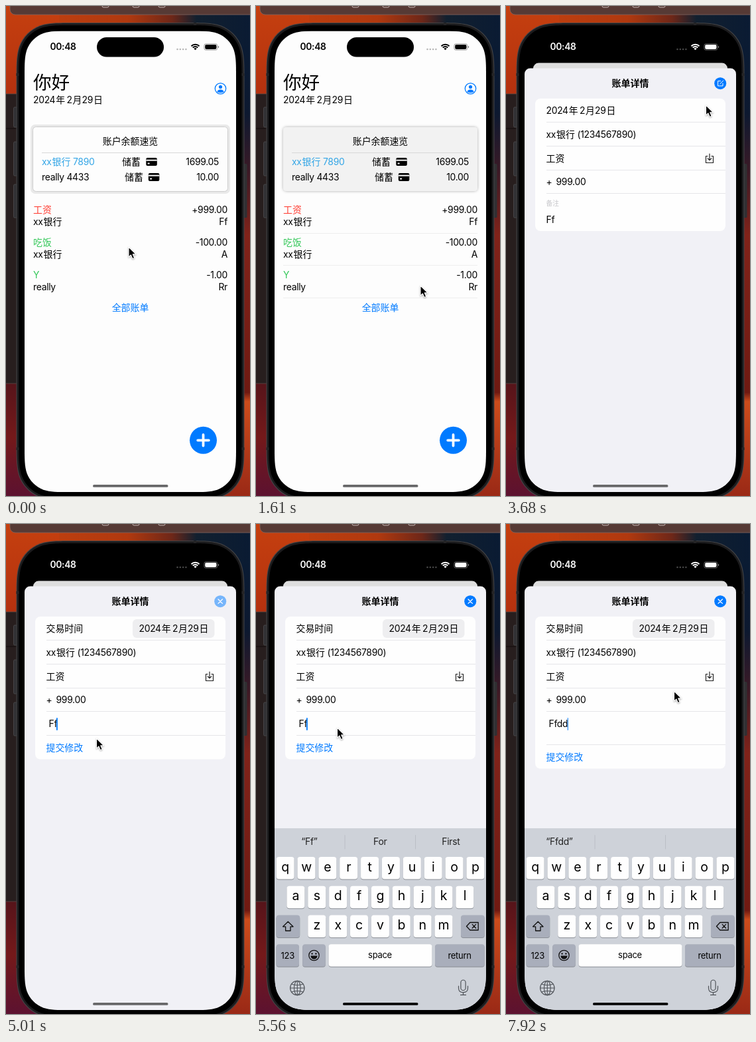
Recreate the animation shown at these times as an HTML page. Size 368 px wide and 736 px high, loop 8000 ms.

```html
<!DOCTYPE html>
<html lang="zh">
<head>
<meta charset="utf-8">
<style>
html,body{margin:0;width:100%;height:100%;overflow:hidden;background:#000}
svg{display:block;width:100vw;height:100vh}
text{font:13.9px Inter,"Noto Sans CJK SC","Noto Sans CJK",sans-serif;letter-spacing:-.3px;white-space:pre}
.c{letter-spacing:0}
</style>
</head>
<body>
<svg id="stage" viewBox="0 0 368 736"></svg>
<script>
const LOOP = 8000, STEP = 146.6;
const BLUE = '#007aff', MID = 'text-anchor="middle"', END = 'text-anchor="end"';
const DATE = '2024年\u20092月29日';

const rect = (x, y, w, h, fill, r = 0, more = '') =>
  `<rect x="${x}" y="${y}" width="${w}" height="${h}" rx="${r}" fill="${fill}" ${more}/>`;
const circle = (x, y, r, fill, more = '') => `<circle cx="${x}" cy="${y}" r="${r}" fill="${fill}" ${more}/>`;
const stroke = (d, color, w = 1, more = '') =>
  `<path d="${d}" fill="none" stroke="${color}" stroke-width="${w}" stroke-linecap="round" stroke-linejoin="round" ${more}/>`;
const rule = (x1, x2, y, color) => `<path d="M${x1} ${y}H${x2}" stroke="${color}"/>`;
const group = (x, y, body, more = '') => `<g transform="translate(${x} ${y}) ${more}">${body}</g>`;
// Chinese runs keep their natural spacing, with a small gap after Latin text
const text = (x, y, s, more = '') => `<text x="${x}" y="${y}" ${more}>` +
  s.replace(/[\u4e00-\u9fff]+/g, (run, at) => `<tspan class="c" dx="${at ? 1 : 0}">${run}</tspan>`) + '</text>';
const size = (px, weight = 400) => `style="font-size:${px}px;font-weight:${weight}"`;

// Rectangle with continuous-curvature corners
function smooth(x, y, w, h, r, fill) {
  const corner = [[0, 1.528], [0, 1.088], [0, .868], [.075, .631], [.169, .373], [.373, .169], [.631, .075], [.868, 0], [1.088, 0], [1.528, 0]];
  const back = [...corner].reverse();
  const side = (pts, right, low) => pts.map(([u, v]) =>
    [right ? x + w - u * r : x + u * r, low ? y + h - v * r : y + v * r]);
  const parts = [side(corner, 0, 0), side(back, 1, 0), side(corner, 1, 1), side(back, 0, 1)];
  const d = parts.map((p, i) => `${i ? 'L' : 'M'}${p[0]}C${p.slice(1).join(' ')}`).join('');
  return `<path d="${d}Z" fill="${fill}"/>`;
}

// Linear track through [step, ...values]
function track(keys, k) {
  let i = 1;
  while (i < keys.length - 1 && keys[i][0] < k) i++;
  const a = keys[i - 1], b = keys[i];
  const p = Math.min(1, Math.max(0, (k - a[0]) / (b[0] - a[0])));
  return a.slice(1).map((v, j) => v + (b[j + 1] - v) * p);
}

const POINTER = [[0,185,362],[8,268,440],[9,266,434],[11,248,420],[14,170,446],[16,112,430],
  [18,70,421],[20,62,420],[22,64,419],[24,190,200],[25,301.5,149],[26,317,117],[29,317,115],
  [31,270,170],[33,152,304],[34,136.5,322],[36,124,308],[38,122.5,306],[43,124,560],
  [48,124,560],[50,190,380],[52,262,150],[53,266,114],[54,253.5,251]];
const SHEET = [[20,0],[21,.35],[22,.8],[23,.95],[24,1]];
const KEYS = [[34,0],[35,.55],[36,.93],[37,1]];

const desktop = `
<defs>
  <linearGradient id="top"><stop stop-color="#c5420f"/><stop offset=".5" stop-color="#b0390f"/>
    <stop offset=".68" stop-color="#6e2718"/><stop offset=".78" stop-color="#12202f"/><stop offset="1" stop-color="#0a1b33"/></linearGradient>
  <linearGradient id="left" x2="0" y2="1"><stop stop-color="#c5400f"/><stop offset=".18" stop-color="#b4310f"/>
    <stop offset=".77" stop-color="#56141a"/><stop offset=".88" stop-color="#74191a"/><stop offset="1" stop-color="#5c1230"/></linearGradient>
  <linearGradient id="right" x2="0" y2="1"><stop stop-color="#0a1b33"/><stop offset=".15" stop-color="#0d1930"/>
    <stop offset=".28" stop-color="#3c1a26"/><stop offset=".42" stop-color="#80231a"/><stop offset=".77" stop-color="#701a12"/>
    <stop offset=".79" stop-color="#cc4c1c"/><stop offset="1" stop-color="#9a2916"/></linearGradient>
  <filter id="soft" x="-10%" y="-20%" width="120%" height="140%"><feDropShadow dx="0" dy="0" stdDeviation="2" flood-opacity=".33"/></filter>
  <clipPath id="screen">${smooth(28, 37.5, 319, 692.5, 45, '#000')}</clipPath>
</defs>
${rect(0, 0, 368, 100, 'url(#top)')}${rect(0, 0, 80, 736, 'url(#left)')}${rect(290, 60, 78, 676, 'url(#right)')}
${rect(6, -12, 375, 25, '#563a35', 8, 'stroke="#806660" stroke-width=".8"')}
${[150, 196, 235].map(x => rect(x - 5, -6, 10, 8, 'none', 2, 'stroke="#c5b8b5"')).join('')}
${rect(-9, 132, 60, 435, '#271e1e', 0, 'stroke="#5a4a47" stroke-width=".8"')}${rule(0, 16, 184, '#100b0b')}
${[[152, 30], [204, 51], [268, 50]].map(([y, h]) => rect(11.5, y, 6, h, '#303033', 1.5, 'stroke="#525255" stroke-width=".7"')).join('')}
${rect(357, 237, 6.5, 81, '#303033', 1.5)}
${smooth(15.5, 25, 344, 717.5, 57, '#444446')}${smooth(16.6, 26.1, 341.8, 715.3, 56, '#1b1b1d')}${smooth(19.5, 29, 336, 709.5, 53, '#000')}
${rect(283, 25, 4, 4, '#242426')}${[101, 663].map(y => rect(15.5, y, 4, 4, '#242426') + rect(355.5, y, 4, 4, '#242426')).join('')}`;

function status(ink) {
  const arc = r => `M${-r * .7} ${-r * .7}A${r} ${r} 0 0 1 ${r * .7} ${-r * .7}`;
  return rect(137, 47, 101, 29.5, '#000', 14.75) +
    text(86, 66.3, '00:48', `${MID} fill="${ink}" ${size(13.8, 600)}`) +
    [0, 1, 2, 3].map(i => circle(258.5 + i * 4.3, 65, 1.3, ink, 'opacity=".28"')).join('') +
    group(285.5, 66.3, stroke(arc(8.6) + arc(5.4), ink, 2, 'style="stroke-linecap:butt"') + `<path d="M0 0L-2.2 -2.4Q0 -4 2.2 -2.4Z" fill="${ink}"/>`) +
    rect(298.8, 56.7, 20, 9.6, 'none', 3, `stroke="${ink}" stroke-opacity=".4" stroke-width=".9"`) +
    rect(300.2, 58.1, 17.2, 6.8, ink, 1.8) + rect(319.8, 60, 1.3, 3, ink, .6, 'opacity=".45"');
}

const bankCard = (x, y) => rect(x, y, 16.5, 12, '#000', 2) + rect(x, y + 2.7, 16.5, 2, '#f4f4f4') + rect(x + 2.3, y + 7.5, 3, 2, '#f4f4f4', .5);

function home(k, radius) {
  const grey = k >= 20, fresh = k < 1;
  const tint = grey ? '#b0b0b2' : BLUE;
  const entry = (y, title, color, account, amount, note) =>
    text(41, y, title, `fill="${color}"`) + text(41, y + 18, account) + text(334, y, amount, END) + text(334, y + 18, note, END);
  const card = fresh
    ? rect(37, 178, 301, 104, '#e9e9e9', 7) + rect(40.5, 181.5, 294, 97, '#fdfdfd', 5, 'stroke="#cdcdcd"')
    : rect(41, 182, 293, 96, '#f2f2f2', 5, 'filter="url(#soft)"');
  return rect(28, 37.5, 319, 692.5, '#fdfdfd', radius) +
    text(41, 125.3, '你好', size(27.6)) + text(41, 146, DATE) +
    circle(323.5, 124, 8.2, 'none', `stroke="${tint}" stroke-width="1.3"`) + circle(323.5, 121.6, 2.6, tint) +
    `<path d="M318.4 129Q319 125.4 323.5 125.4T328.6 129Q323.5 131.4 318.4 129Z" fill="${tint}"/>` +
    card + text(187.5, 208.3, '账户余额速览', MID) + rule(54, 321, 220.5, '#d8d8d8') +
    text(54, 239, 'xx银行 7890', 'fill="#32a5e6"') + text(175, 239, '储蓄') + bankCard(211.3, 228) + text(321, 239, '1699.05', END) +
    text(54, 262, 'really 4433') + text(179, 262, '储蓄') + bankCard(214.8, 251) + text(321, 262, '10.00', END) +
    entry(311, '工资', '#ff3b30', 'xx银行', '+999.00', 'Ff') +
    entry(360, '吃饭', '#34c759', 'xx银行', '-100.00', 'A') +
    entry(409, 'Y', '#34c759', 'really', '-1.00', 'Rr') +
    (fresh ? '' : [341.5, 389.5, 438.5].map(y => rule(41, 334, y, '#eee')).join('')) +
    text(187.5, 457.7, '全部账单', `${MID} fill="${grey ? '#bcbcbe' : BLUE}"`) +
    circle(297.5, 652.3, 20.5, grey ? '#b9b9b9' : BLUE) + stroke('M289.2 652.3H305.8M297.5 644V660.6', '#fff', 3.8);
}

function sheet(k) {
  const edit = k >= 30, note = k < 45 ? 'Ff' : k < 48 ? 'Ffd' : 'Ffdd';
  const grow = k >= 48 ? 14 : 0, bottom = edit ? 353.5 + grow : 338;
  const pale = k === 29 || k === 34 || k === 35;
  const lines = [174.5, 210.5, 246.5, 281.5].concat(edit ? 317.5 + grow : []);
  const caret = 76 + (note.length - 2) * 8.2;
  return rect(28, 93.5, 319, 660, '#f1f1f6', 8.5) +
    text(187.5, 121, '账单详情', `${MID} ${size(14, 600)}`) +
    circle(323.2, 116.2, 9, pale ? '#76b5fb' : BLUE) +
    (edit ? stroke('M320 113L326.4 119.4M326.4 113L320 119.4', '#fff', 1.3)
          : stroke('M323.5 112.7H319.6V120H327V116.3M322.8 117L327.6 112.2', '#fff', 1)) +
    rect(44, 139, 287, bottom - 139, '#fefefe', 8) + lines.map(y => rule(61, 331, y, '#e6e6e9')).join('') +
    (edit ? text(60.5, 162, '交易时间') + rect(191, 143, 123.5, 28, '#eeeef0', 6) : '') +
    text(edit ? 200.5 : 60.5, 162, DATE) +
    text(60.5, 198, 'xx银行 (1234567890)') + text(60.5, 233.7, '工资') +
    text(60.5, 269.3, '+') + text(75.5, 269.3, '999.00') +
    stroke('M304 225.5H301.5V235.5H312.5V225.5H310M307 222V231.5M304.3 229L307 231.7L309.7 229', '#222', 1.2) +
    (edit
      ? text(64.5, 305, note) + (k >= 33 ? rect(caret, 291, 1.8, 19, BLUE, .9, k === 54 ? 'opacity=".6"' : '') : '') +
        text(60.5, 340.7 + grow, '提交修改', `fill="${BLUE}"`)
      : text(60.5, 300, '备注', `fill="#c5c5c9" ${size(9.7)}`) + text(60.5, 325.7, 'Ff'));
}

function keyboard(k) {
  const key = (x, y, w, fill = '#fefefe') => rect(x, y + 1, w, 33.5, '#8b8f96', 4) + rect(x, y, w, 33.5, fill, 4);
  const row = (letters, x0, y) => [...letters].map((c, i) => {
    const x = x0 + i * 31.87;
    return key(x, y, 27) + text(x + 13.5, y + 21.7, c, `${MID} ${size(19.5)}`);
  }).join('');
  const words = k < 47 ? ['“Ff”', 'For', 'First'] : [k < 48 ? '“Ffd”' : '“Ffdd”'];
  const dark = '#a9aebb', ink = '#4f5359';
  const popup = k === 44 || k === 47
    ? `<path d="M103 492H144Q149.5 492 149.5 498V525C149.5 534 137.3 533 137.3 543V573Q137.3 577.5 133 577.5H114.5Q110.2 577.5 110.2 573V543C110.2 533 98 534 98 525V498Q98 492 103 492Z" fill="#fefefe" stroke="#b5b9c0" stroke-width=".6"/>` +
      text(123.7, 523, 'd', `${MID} ${size(29)}`) : '';
  return rect(28, 457, 319, 290, '#ced2d9') +
    words.map((w, i) => text(80.5 + i * 106.7, 482.3, w, `${MID} fill="#222"`)).join('') +
    stroke('M134 467.5V488M240.5 467.5V488', '#b9bdc5', .9) +
    row('qwertyuiop', 30.6, 500) + row('asdfghjkl', 46.4, 543.7) + row('zxcvbnm', 78.3, 587.4) +
    key(30.6, 587.4, 35.6, dark) + stroke('M48.3 597.3L56 604.8H52V611H44.6V604.8H40.6Z', '#111', 1.3) +
    key(309, 587.4, 35.6, dark) + stroke('M317.5 604.2L322.8 598.5H335.2V610H322.8ZM326.2 601.4L331.6 607M331.6 601.4L326.2 607', '#111', 1.3) +
    key(30.6, 631.2, 34.4, dark) + text(47.8, 652.8, '123', `${MID} ${size(13)}`) +
    key(70.2, 631.2, 34.6, dark) + circle(87.5, 648, 7.7, 'none', 'stroke="#111" stroke-width="1.3"') +
    circle(84.6, 645.4, 1.2, '#111') + circle(90.4, 645.4, 1.2, '#111') + '<path d="M82.3 648.6H92.7Q91.7 653.8 87.5 653.8T82.3 648.6Z" fill="#111"/>' +
    key(109.5, 631.2, 156) + text(187, 652.3, 'space', `${MID} ${size(13)}`) +
    key(270, 631.2, 74.6, dark) + text(307, 652.8, 'return', `${MID} ${size(13)}`) +
    group(62.3, 697, circle(0, 0, 10.7, 'none', `stroke="${ink}" stroke-width="1.2"`) +
      `<ellipse rx="4.8" ry="10.7" fill="none" stroke="${ink}" stroke-width="1.1"/>` +
      stroke('M0 -10.7V10.7M-10.7 0H10.7M-8.6 -6Q0 -2.6 8.6 -6M-8.6 6Q0 2.6 8.6 6', ink, 1.1)) +
    group(312.5, 696, rect(-3.6, -11, 7.2, 15.5, 'none', 3.6, `stroke="${ink}" stroke-width="1.2"`) +
      stroke('M-7 -2V1Q-7 7.6 0 7.6T7 1V-2M0 7.6V11.4M-4 11.4H4', ink, 1.2)) + popup;
}

const pointer = (x, y) => group(x, y,
  '<path d="M0 0V15.2L3.4 12L5.9 17.6L8.6 16.4L6.2 10.9H11Z" fill="#000" stroke="#fff" stroke-width="1.1" stroke-linejoin="round" filter="drop-shadow(0 1px 1px #0005)"/>');

function scene(k) {
  const [p] = track(SHEET, k), [up] = track(KEYS, k), [x, y] = track(POINTER, k);
  const scale = 1 - .0815 * p, radius = p ? 9 + 37 * (1 - p) : 0;
  const shade = rect(28, 37.5, 319, 692.5, '#000', radius, `opacity="${.12 * p}"`);
  const page = group(187.5, 37.5 + 48 * p, home(k, radius) + shade, `scale(${scale}) translate(-187.5 -37.5)`);
  return desktop + `<g clip-path="url(#screen)">${page}` +
    (p ? group(0, (1 - p) * 640, sheet(k)) : '') +
    (up ? group(0, (1 - up) * 275, keyboard(k)) : '') + '</g>' +
    status(p > .3 ? '#fff' : '#000') +
    rect(131, 719, 113.5, 3.8, up > .5 ? '#000' : '#686869', 1.9) + pointer(x, y);
}

const stage = document.getElementById('stage');
let shown = -1;
function draw() {
  const k = Math.min(54, Math.floor((performance.now() % LOOP + 12) / STEP));
  if (k !== shown) stage.innerHTML = scene(shown = k);
  requestAnimationFrame(draw);
}
draw();
</script>
</body>
</html>
```
